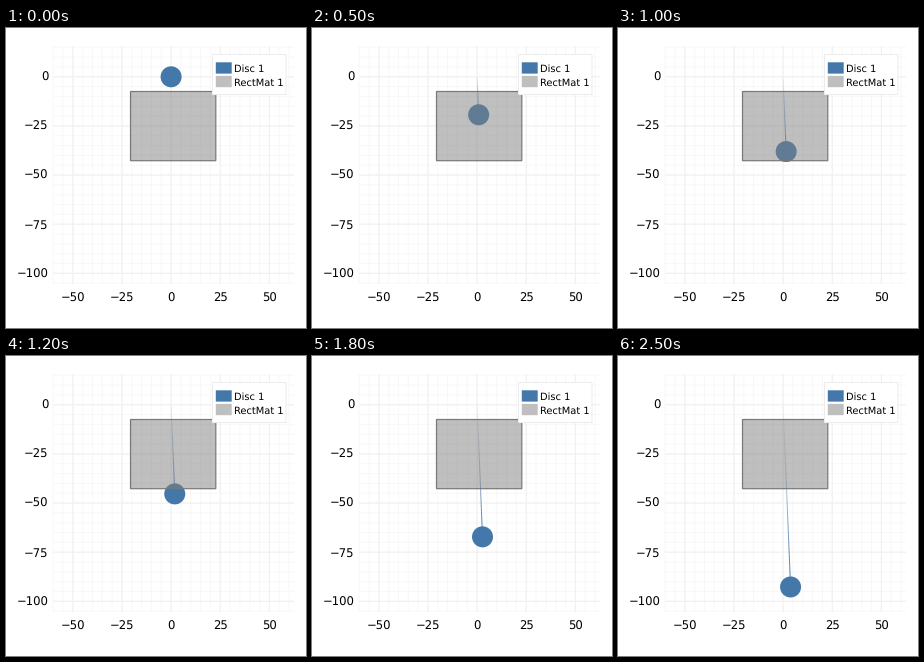
Write a matplotlib script that moves like this. It is 300 by 300 pixels and loops after 2550 ms.

```python
import numpy as np
import matplotlib.pyplot as plt
from matplotlib.animation import FuncAnimation
from matplotlib.collections import LineCollection
from matplotlib.patches import Circle, Rectangle

plt.rcParams["font.family"] = "DejaVu Sans"
plt.rcParams["text.hinting"] = "none"

SIZE, DPI = 300, 100
FRAMES, STEP_MS = 51, 50
PT = 72 / DPI                      # points per pixel
X0, Y0, SCALE = 165.1, 48.8, 1.965  # origin and pixels per unit
LEFT, RIGHT, TOP, BOTTOM = 47, 288, 18, 256
BLUE = "#4477aa"
RADIUS = 10.5

# The disc glides freely, slows on the mat, then glides on (pixels per frame).
V_IN, V_OUT = 3.82, 3.58
ENTER, LEAVE = 4.0, 22.5
DRIFT = 0.041


def to_x(u):
    return X0 + SCALE * u


def to_y(v):
    return Y0 - SCALE * v


def disc_at(t):
    t = np.asarray(t, dtype=float)
    on_mat = np.clip(t - ENTER, 0, LEAVE - ENTER)
    slowing = (V_IN - V_OUT) / (LEAVE - ENTER)
    drop = (V_IN * np.minimum(t, ENTER)
            + V_IN * on_mat - slowing * on_mat ** 2 / 2
            + V_OUT * np.maximum(t - LEAVE, 0))
    return X0 + DRIFT * drop, Y0 + drop


fig = plt.figure(figsize=(SIZE / DPI, SIZE / DPI), dpi=DPI, facecolor="white")
ax = fig.add_axes([0, 0, 1, 1])
ax.set_xlim(0, SIZE)
ax.set_ylim(SIZE, 0)
ax.axis("off")


def draw_grid(step, color, z):
    style = dict(color=color, lw=PT, zorder=z, solid_capstyle="butt",
                 snap=False)
    for u in range(-100, 101, step):
        if LEFT <= to_x(u) <= RIGHT:
            ax.plot([to_x(u)] * 2, [TOP, BOTTOM], **style)
    for v in range(-125, 51, step):
        if TOP <= to_y(v) <= BOTTOM:
            ax.plot([LEFT, RIGHT], [to_y(v)] * 2, **style)


def box(x, y, w, h, z, fill="none", edge="none", line=1.0):
    ax.add_patch(Rectangle((x, y), w, h, fc=fill, ec=edge, lw=line * PT,
                           zorder=z, snap=False))


def label(x, y, text, px, **align):
    ax.text(x, y, text, fontsize=px * PT, color="black", zorder=8,
            va="baseline", **align)


def tick_text(value):
    return str(value).replace("-", "\u2212")


draw_grid(5, "#f8f8f8", 0)
draw_grid(25, "#f0f0f0", 1)

for u in range(-50, 51, 25):
    label(to_x(u), 274.2, tick_text(u), 11.6, ha="center")
for v in range(-100, 1, 25):
    label(42.5, to_y(v) + 4.2, tick_text(v), 11.6, ha="right")

# Moving parts
trail = LineCollection([], linewidths=PT, capstyle="butt", zorder=2)
ax.add_collection(trail)
disc = Circle((X0, Y0), RADIUS, fc=BLUE, ec="none", zorder=3)
ax.add_patch(disc)

# Mat, translucent above the disc
mat = (124.5, 63.5, 85.3, 69.2)
box(*mat, 4, fill=(0.5, 0.5, 0.5, 0.5))
box(*mat, 5, edge="#787878", line=1.2)

# Legend
box(206.5, 26.5, 73.5, 40, 6, fill="white", edge="#ececec")
for top, color, name in ((34.3, BLUE, "Disc 1"), (47.9, "#bfbfbf", "RectMat 1")):
    box(209.8, top, 15.9, 11.3, 7, fill=color)
    label(227.7, top + 10, name, 9.9, ha="left")


def update(frame):
    xs, ys = disc_at(np.arange(frame + 1))
    points = np.column_stack([xs, ys])
    trail.set_segments(list(np.stack([points[:-1], points[1:]], axis=1)))
    rgb = (0x44 / 255, 0x77 / 255, 0xAA / 255)
    trail.set_color([(*rgb, (i + 1) / frame) for i in range(frame)])
    disc.center = xs[-1], ys[-1]
    return trail, disc


anim = FuncAnimation(fig, update, frames=FRAMES, interval=STEP_MS,
                     repeat=True, repeat_delay=0, blit=False)
plt.show()
```
